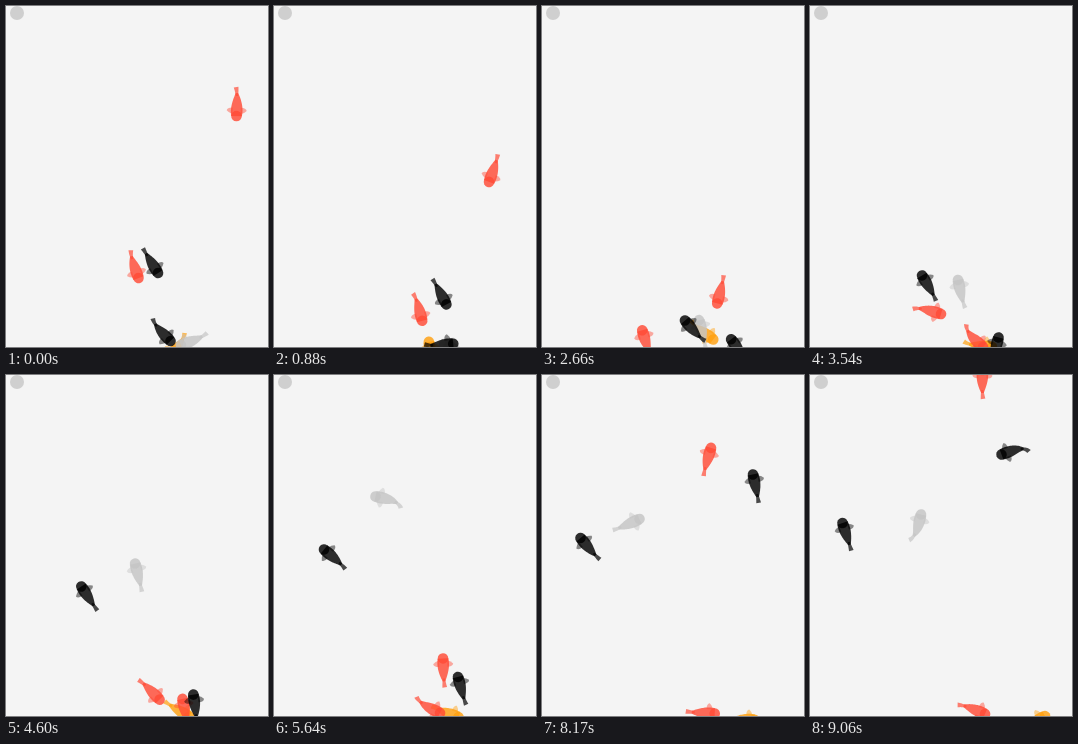
An HTML page with a canvas for the animation above (9160 ms loop, 262 by 341 pixels).

```html
<!DOCTYPE html>
<html lang="en">
<head>
<meta charset="utf-8">
<title>Koi pond</title>
<style>
  html, body { margin: 0; width: 100%; height: 100%; overflow: hidden; background: #f4f4f4; }
  canvas { position: absolute; left: 0; top: 0; width: 262px; height: 341px; }
  .badge { position: absolute; left: 4px; top: 0; width: 14px; height: 14px; border-radius: 50%; background: #cfcfcf; }
</style>
</head>
<body>
<canvas id="pond"></canvas>
<div class="badge"></div>
<script>
const W = 262, H = 341, LOOP = 9160, LAST = 9.06;
const LENGTH = 29, BODY_END = 23, TAIL_START = 20;
const TAIL_LAG = 0.25, MAX_BEND = 75;
const RAD = Math.PI / 180;
const RED = '#ff4a36', BLACK = '#000', GREY = '#c4c4c4', ORANGE = '#ffa010';

const canvas = document.getElementById('pond');
const ctx = canvas.getContext('2d');
const scale = window.devicePixelRatio || 1;
canvas.width = W * scale;
canvas.height = H * scale;

// A fish passes each waypoint (seconds, x, y, heading in degrees) facing that
// way, at the slower of the mean speeds before and after it.
const school = [];
function addFish(color, ...waypoints) {
  const path = waypoints.map(([t, x, y, heading]) => ({ t, x, y, heading: heading * RAD }));
  const speeds = path.slice(1).map((b, i) =>
    Math.hypot(b.x - path[i].x, b.y - path[i].y) / (b.t - path[i].t));
  path.forEach((p, i) => {
    const speed = Math.min(speeds[i - 1] ?? Infinity, speeds[i] ?? Infinity);
    p.vx = speed * Math.cos(p.heading);
    p.vy = speed * Math.sin(p.heading);
  });
  school.push({ color, path, phase: school.length });
}

addFish(ORANGE,
  [0, 163, 351, 130], [1.79, 156.5, 320, 53], [3.54, 182, 341, 5],
  [6.75, 185.5, 342, -50], [LAST, 235, 341, -30]);
addFish(GREY,
  [0, 175, 339, 160], [1.79, 165, 337, 155], [3.54, 148, 274, 258],
  [5.64, 101.5, 121.5, 192], [6.75, 85.5, 145.5, 52], [8.17, 97.5, 144, -25],
  [LAST, 111, 139.5, -76]);
addFish(RED,
  [0, 132.5, 272, 70], [1.79, 140, 349, 155], [2.8, 100, 318, 285],
  [3.54, 131, 308, 17], [5.64, 166, 338, 26], [LAST, 175, 339, 23]);
addFish(RED,
  [0, 230.5, 110, 92], [1.79, 193, 237, 105], [3.54, 173, 341, 42],
  [5.64, 169, 283.5, 268], [6.75, 165.5, 171.5, 268], [8.17, 169, 73, 287],
  [LAST, 172.5, -5, 271]);
addFish(BLACK,
  [0, 152, 267, 58], [1.79, 173.5, 329, 133], [3.54, 112, 269.5, 239],
  [5.64, 50, 174.5, 220], [8.17, 38.5, 163, 230], [LAST, 32.5, 148, 252]);
addFish(BLACK,
  [0, 164.5, 335, 45], [1.79, 190, 335, -92], [3.54, 188.5, 331.5, -75],
  [5.64, 184, 302, -105], [6.75, 198, 223, -67], [8.17, 211, 99.5, -102],
  [LAST, 191.5, 79.5, 160]);

// Cubic Hermite curve; the heading is the direction of travel.
function poseAt(path, t) {
  let i = 0;
  while (i < path.length - 2 && t >= path[i + 1].t) i++;
  const a = path[i], b = path[i + 1], span = b.t - a.t, u = (t - a.t) / span;
  const ease = u * u * (3 - 2 * u);
  const axis = (p, v) => ({
    at: a[p] + (b[p] - a[p]) * ease + span * u * (1 - u) * (a[v] * (1 - u) - b[v] * u),
    rate: 6 * u * (1 - u) * (b[p] - a[p]) / span +
      a[v] * (1 - u) * (1 - 3 * u) + b[v] * u * (3 * u - 2)
  });
  const x = axis('x', 'vx'), y = axis('y', 'vy');
  return { x: x.at, y: y.at, heading: Math.atan2(y.rate, x.rate) };
}

// The tail trails behind every turn and beats gently.
function bendAt({ path, phase }, t, heading) {
  const turn = poseAt(path, t - TAIL_LAG).heading - heading;
  const lag = Math.atan2(Math.sin(turn), Math.cos(turn)) / RAD;
  const beat = 12 * Math.sin(10 * t + phase);
  return RAD * (MAX_BEND * Math.tanh(1.5 * lag / MAX_BEND) + beat);
}

function spineFor(bend) {
  const spine = [];
  let x = 0, y = 0;
  for (let s = 0; s <= LENGTH; s++) {
    const angle = Math.PI + bend * (s / LENGTH) ** 3.5;
    const dx = Math.cos(angle), dy = Math.sin(angle);
    spine.push({ x, y, dx, dy });
    x += dx;
    y += dy;
  }
  return spine;
}

function ribbon(spine, from, to, width) {
  const edge = (s, side) => {
    const p = spine[s], w = width(s) * side;
    ctx.lineTo(p.x - p.dy * w, p.y + p.dx * w);
  };
  ctx.beginPath();
  for (let s = from; s <= to; s++) edge(s, 1);
  for (let s = to; s >= from; s--) edge(s, -1);
  ctx.fill();
}

function fin(side) {
  ctx.beginPath();
  ctx.moveTo(-2, 4 * side);
  ctx.quadraticCurveTo(-3, 8 * side, -5.5, 10 * side);
  ctx.quadraticCurveTo(-8.5, 9.5 * side, -8.5, 4 * side);
  ctx.fill();
}

function drawFish(fish, t) {
  const { x, y, heading } = poseAt(fish.path, t);
  const spine = spineFor(bendAt(fish, t, heading));
  ctx.save();
  ctx.translate(x, y);
  ctx.rotate(heading);
  ctx.fillStyle = fish.color;

  ctx.globalAlpha = 0.45;
  fin(-1);
  fin(1);

  ctx.globalAlpha = 0.7;
  ribbon(spine, TAIL_START, LENGTH, s => 1.1 + (s - TAIL_START) * 0.14);

  ctx.globalAlpha = 0.82;
  ribbon(spine, 0, BODY_END, s => 5.8 * Math.cos(Math.PI / 2 * (s - 5) / 21));
  ctx.beginPath();
  ctx.arc(0, 0, 5.3, 0, 2 * Math.PI);
  ctx.fill();
  ctx.restore();
}

function frame(now) {
  const t = Math.min((now % LOOP) / 1000, LAST);
  ctx.setTransform(scale, 0, 0, scale, 0, 0);
  ctx.clearRect(0, 0, W, H);
  for (const fish of school) drawFish(fish, t);
  requestAnimationFrame(frame);
}
frame(performance.now());
</script>
</body>
</html>
```
